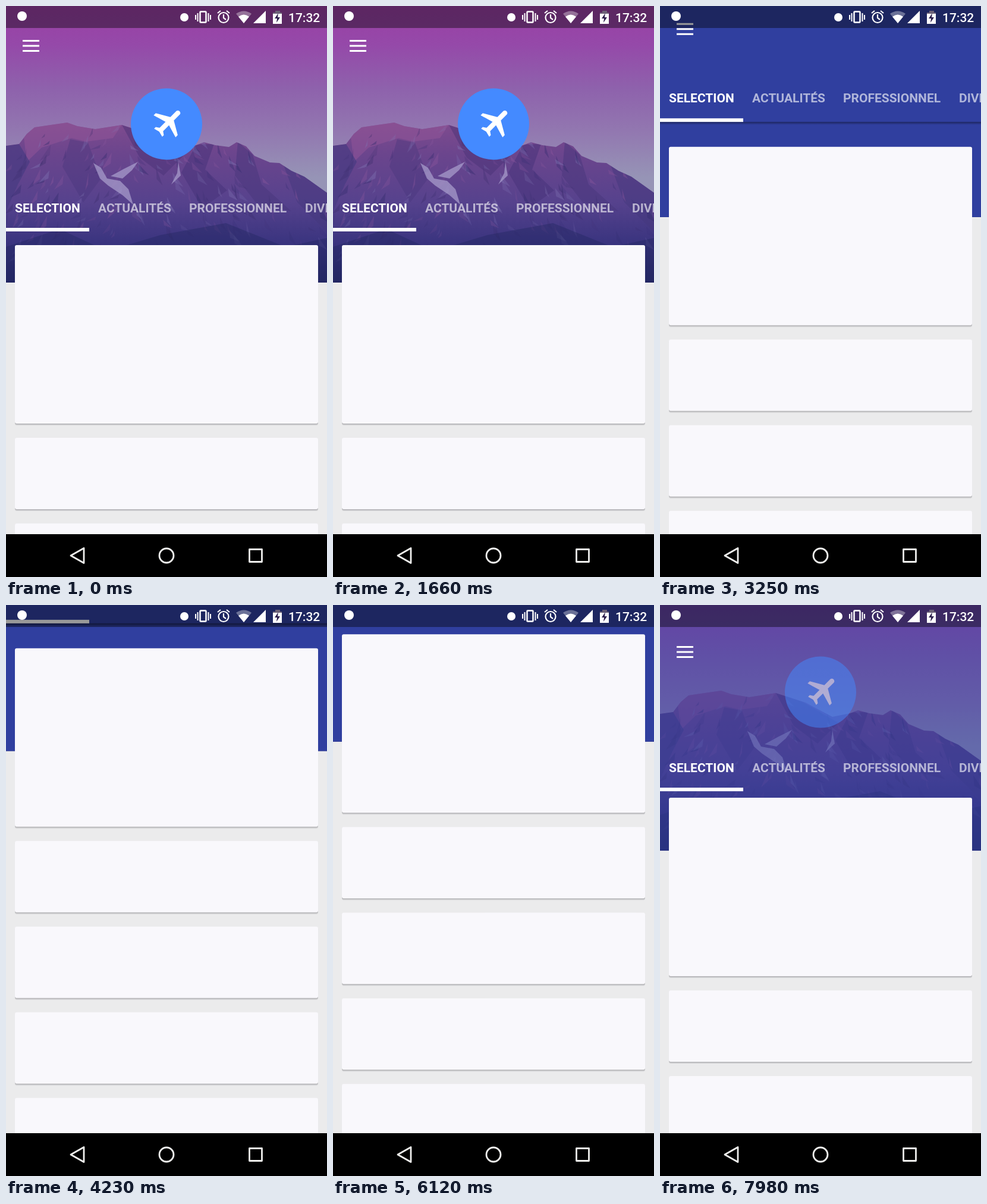
Animation of 540 by 960 pixels, one loop 8 s. Source, as an HTML page:

```html
<!DOCTYPE html>
<html lang="fr">
<head>
<meta charset="utf-8">
<title>Header scroll</title>
<style>
html, body { margin: 0; width: 100%; height: 100%; overflow: hidden; background: #000; }
svg { display: block; width: 540px; height: 960px; }
text { font-family: Roboto, "Noto Sans", sans-serif; font-size: 21px; }
.tabs text { font-weight: 700; fill: #fff; fill-opacity: .62; }
.tabs .on { fill-opacity: 1; }
</style>
</head>
<body>
<svg viewBox="0 0 540 960">
  <defs>
    <linearGradient id="sky" x1="0" y1="0" x2="0" y2="1">
      <stop offset="0" stop-color="#9a3fa4"/>
      <stop offset=".14" stop-color="#9549a9"/>
      <stop offset=".3" stop-color="#8e62ac"/>
      <stop offset=".45" stop-color="#9277b0"/>
      <stop offset=".62" stop-color="#9694b6"/>
    </linearGradient>
    <linearGradient id="rock" gradientUnits="userSpaceOnUse" x1="0" y1="195" x2="0" y2="465">
      <stop offset="0" stop-color="#7f4b8e"/>
      <stop offset=".2" stop-color="#6b458d"/>
      <stop offset=".5" stop-color="#56428d"/>
      <stop offset=".75" stop-color="#3a347f"/>
      <stop offset="1" stop-color="#232764"/>
    </linearGradient>
    <linearGradient id="shade" x1="0" y1="0" x2="0" y2="1">
      <stop offset="0" stop-color="#000" stop-opacity=".4"/>
      <stop offset="1" stop-color="#000" stop-opacity="0"/>
    </linearGradient>
    <clipPath id="ridge"><path d="M0 235 22 232 35 215 48 204 75 200 103 196 120 202 150 207 195 200 214 206 245 216 290 240 320 234 333 229 352 234 375 237 388 229 404 236 418 252 444 263 460 264 480 277 502 287 540 314V465H0Z"/></clipPath>
    <clipPath id="screen"><rect width="540" height="888"/></clipPath>
  </defs>

  <g clip-path="url(#screen)">
    <rect width="540" height="888" fill="#ebebec"/>

    <g id="header">
      <rect width="540" height="465" fill="url(#sky)"/>
      <g clip-path="url(#ridge)">
        <rect y="190" width="540" height="275" fill="url(#rock)"/>
        <path d="M48 203 103 195 150 207 195 199 180 222 135 228 110 222 60 238 35 262 30 220Z" fill="#93569a" opacity=".5"/>
        <path d="M0 235 22 232 40 262 20 300 0 345Z" fill="#483b82" opacity=".7"/>
        <path d="M108 224 138 230 160 290 130 330 95 270Z" fill="#46357c" opacity=".4"/>
        <path d="M195 200 240 215 300 250 265 285 225 255Z" fill="#4a3378" opacity=".5"/>
        <path d="M320 233 350 232 335 275 372 310 330 340 295 280Z" fill="#46337a" opacity=".5"/>
        <path d="M390 228 415 250 430 300 480 345 420 330 385 285Z" fill="#48367c" opacity=".5"/>
        <path d="M465 262 540 306V380L490 330Z" fill="#44387f" opacity=".5"/>
        <g id="facets"></g>
        <g fill="#a79bcb" opacity=".75">
          <path d="M147 264 160 272 170 290 192 294 206 308 214 334 196 318 172 302 158 290Z"/>
          <path d="M176 286 198 274 222 262 212 276 196 290Z"/>
          <path d="M290 262 294 285 278 300 288 281Z"/>
        </g>
        <path d="M0 405 90 375 170 412 260 385 370 365 470 405 540 390V465H0Z" fill="#22265f" opacity=".4"/>
      </g>
      <rect id="tint" width="540" height="465" fill="#303f9f"/>
      <g id="logo">
        <circle cx="270" cy="198.500" r="60" fill="#448aff"/>
        <path transform="translate(274 195) rotate(45) scale(2.75 2.55) translate(-11.500 -12)" fill="#fff" d="M21 16v-2l-8-5V3.500C13 2.670 12.330 2 11.500 2S10 2.670 10 3.500V9l-8 5v2l8-2.500V19l-2 1.500V22l3.500-1 3.500 1v-1.500L13 19v-5.500z"/>
      </g>
    </g>

    <g id="cards"></g>

    <g id="bar">
      <rect y="-20" width="540" height="255" fill="#303f9f"/>
      <rect y="235" width="540" height="5" fill="url(#shade)"/>
    </g>
    <g id="tabs" class="tabs">
      <text class="on" x="15" y="346.500">SELECTION</text>
      <text x="155" y="346.500">ACTUALITÉS</text>
      <text x="308" y="346.500">PROFESSIONNEL</text>
      <text x="503" y="346.500">DIVERTISSEMENT</text>
      <rect y="373" width="140" height="6" fill="#fff"/>
    </g>
    <path id="menu" d="M28 70.500h28M28 79h28M28 87.500h28" stroke="#fff" stroke-width="3"/>

    <rect width="540" height="37" fill="#000" opacity=".4"/>
    <g fill="#fff">
      <circle cx="27" cy="17" r="8"/>
      <circle cx="300" cy="19" r="7"/>
      <path d="M319 15v8M322.500 12v14M340.500 12v14M344 15v8" stroke="#fff" stroke-width="2"/>
      <rect x="326.500" y="9.500" width="10" height="18" rx="1" fill="none" stroke="#fff" stroke-width="2.500"/>
      <g fill="none" stroke="#fff" stroke-width="2.200">
        <circle cx="366" cy="19.500" r="8.500"/>
        <path d="M366 14v6l4 3M356 12l5-4M376 12l-5-4"/>
      </g>
      <path d="M387 13Q400 4 413 13L400 29Z" opacity=".35"/>
      <path d="M391 18Q400 11 409 18L400 29Z"/>
      <path d="M437 8V29H416Z"/>
      <path d="M453 8h8v3h3v19h-15V11h4Z"/>
      <path d="M453 8h8v3h3v2h-15v-2h4Z" fill="#6d6378"/>
      <path d="M458 12l-6 9h4l-1 7 6-9h-4Z" fill="#2d1f4c"/>
      <text x="475" y="27" font-weight="500">17:32</text>
    </g>
  </g>

  <rect y="888" width="540" height="72" fill="#000"/>
  <g fill="none" stroke="#f0f0ee" stroke-width="2.800" stroke-linejoin="round">
    <path d="M109 924 131 911.500V936.500Z"/>
    <circle cx="270" cy="924" r="12"/>
    <rect x="409.500" y="913.500" width="21" height="21"/>
  </g>
</svg>
<script>
const LOOP = 8000;
const TURN = 5400;       // the drag reverses during this pause
const JOIN = 156;        // scroll at which the tabs dock under the toolbar
const $ = id => document.getElementById(id);
const clamp = (v, a = 0, b = 1) => Math.min(b, Math.max(a, v));
const smooth = v => { v = clamp(v); return v * v * (3 - 2 * v); };
const shift = (id, y) => $(id).setAttribute("transform", `translate(0 ${y.toFixed(2)})`);
const fade = (id, v) => $(id).setAttribute("opacity", v.toFixed(3));

function add(parent, name, attrs) {
  const el = document.createElementNS("http://www.w3.org/2000/svg", name);
  for (const key in attrs) el.setAttribute(key, attrs[key]);
  parent.appendChild(el);
}

function buildCards() {
  for (let i = 0; i < 6; i++) {
    const y = i ? 582 + 144 * i : 402, height = i ? 120 : 300;
    const box = { x: 15, width: 510, height, rx: 3 };
    add($("cards"), "rect", { ...box, y: y + 3, fill: "#4c4c54", opacity: .15 });
    add($("cards"), "rect", { ...box, y: y + 1.5, fill: "#4c4c54", opacity: .22 });
    add($("cards"), "rect", { ...box, y, fill: "#f9f8fc" });
  }
}

// Seeded slivers give the rock its texture.
function buildFacets() {
  let seed = 29;
  const rnd = () => (seed = seed * 16807 % 2147483647) / 2147483647;
  const tones = ["#332c6e", "#8a569c", "#3a2d6c", "#7f74b3"];
  for (let i = 0; i < 220; i++) {
    const x = rnd() * 540, y = 200 + rnd() * 230;
    const w = 5 + rnd() * 14, h = 8 + rnd() * 22, lean = x < 200 ? -1 : 1;
    add($("facets"), "path", {
      d: `M${x} ${y}l${w * lean} ${h}l${-w * lean * .9} ${-h * .35}Z`,
      fill: tones[i % 4], opacity: (.18 + rnd() * .25) * (y > 340 ? .6 : 1)
    });
  }
}

const keys = [[0, 0], [2200, 0], [3250, 165], [4230, 329], [4990, 420],
  [5690, 420], [6120, 353], [6960, 215], [7980, 78], [8000, 76]];

const slope = i => i < 0 || i > keys.length - 2 ? 0
  : (keys[i + 1][1] - keys[i][1]) / (keys[i + 1][0] - keys[i][0]);
// Harmonic mean keeps the curve monotone between keys.
function tangent(i) {
  const a = slope(i - 1), b = slope(i);
  return a * b > 0 ? 2 * a * b / (a + b) : 0;
}
function scrollAt(t) {
  let i = 0;
  while (i < keys.length - 2 && t >= keys[i + 1][0]) i++;
  const [t0, v0] = keys[i], [t1, v1] = keys[i + 1];
  const d = t1 - t0, u = (t - t0) / d, w = 1 - u;
  return v0 * (1 + 2 * u) * w * w + v1 * u * u * (3 - 2 * u)
    + d * u * w * (tangent(i) * w - tangent(i + 1) * u);
}

function toolbarAt(t, s) {
  if (t < TURN) return s < 12 ? s - 12 : Math.min(0, 125 - s);
  return Math.min(0, 167 - s - 60 * (1 - smooth((t - 6150) / 450)));
}

function draw(t) {
  const s = scrollAt(t), top = toolbarAt(t, s), p = clamp(s / JOIN);
  shift("header", -s / 1.5);
  fade("tint", p);
  fade("logo", 1 - p);
  shift("cards", -s);
  shift("bar", top);
  fade("bar", s >= JOIN ? 1 : 0);
  shift("tabs", 12 - Math.min(s, JOIN) + top);
  shift("menu", top);
}

buildCards();
buildFacets();
const start = performance.now();
function tick() {
  draw((performance.now() - start) % LOOP);
  requestAnimationFrame(tick);
}
draw(0);
requestAnimationFrame(tick);
</script>
</body>
</html>
```
